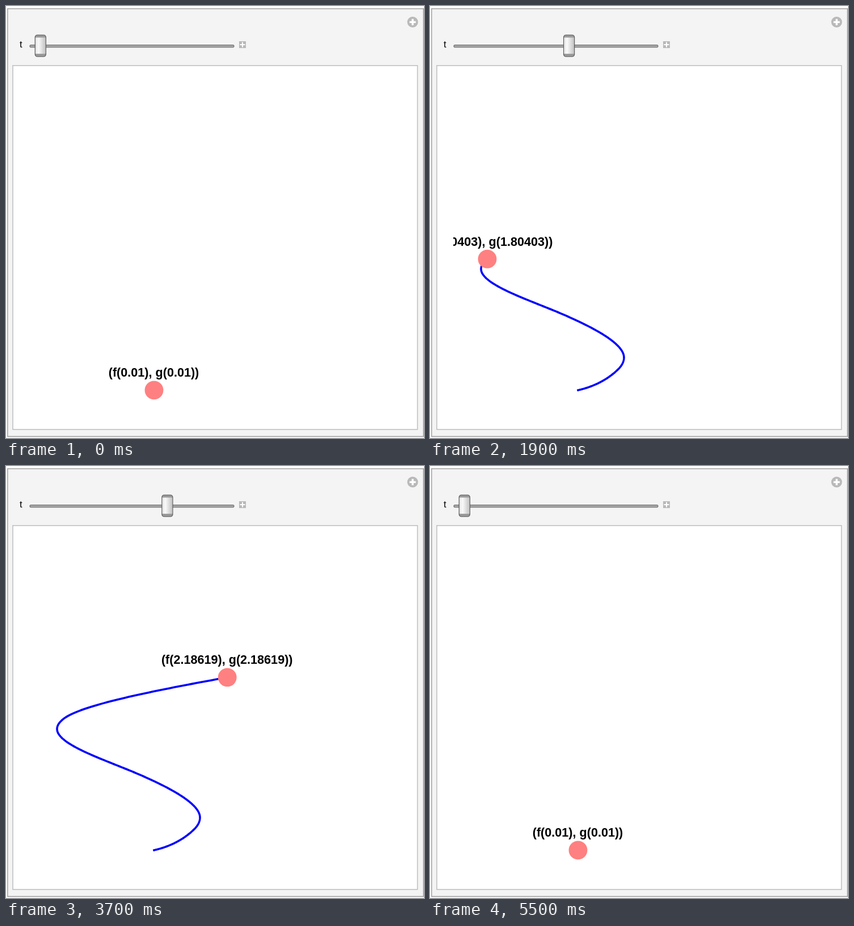
Animation, 737 px wide and 760 px high, one loop 6 s. Source, as an HTML page with a canvas:

```html
<!DOCTYPE html>
<html>
<head>
<meta charset="utf-8">
<style>
html, body { margin: 0; width: 100%; height: 100%; overflow: hidden; background: #fff; }
canvas { display: block; }
</style>
</head>
<body>
<canvas id="stage" width="737" height="760"></canvas>
<script>
const ctx = document.getElementById('stage').getContext('2d');
const T_MIN = 0.01, T_MAX = Math.PI;

// Knots of the horizontal motion: [t, x, dx/dt]
const knots = [
  [0, 259.3, 172], [0.53, 332, 102], [0.715, 342, 0], [1.2945, 217.3, -400],
  [1.71, 90, 0], [1.804, 101, 234], [2.186, 390, 1080], [2.541, 646, 0],
  [2.823, 448.3, -1130], [3.142, 140, -700]
];

function f(t) {
  let k = 0;
  while (k < knots.length - 2 && t > knots[k + 1][0]) k++;
  const [t0, x0, v0] = knots[k], [t1, x1, v1] = knots[k + 1];
  const h = t1 - t0, u = (t - t0) / h, w = 1 - u;
  return w * w * ((1 + 2 * u) * x0 + u * h * v0) + u * u * ((3 - 2 * u) * x1 - w * h * v1);
}

const g = t => 676.3 - t * (37.6 + t * (67.5 - 9.6 * t));

function box(x, y, w, h, r, fill, stroke, line = 1) {
  ctx.beginPath();
  ctx.roundRect(x, y, w, h, r);
  ctx.fillStyle = fill;
  ctx.fill();
  if (stroke) {
    ctx.strokeStyle = stroke;
    ctx.lineWidth = line;
    ctx.stroke();
  }
}

function disc(x, y, r, fill) {
  ctx.beginPath();
  ctx.arc(x, y, r, 0, 2 * Math.PI);
  ctx.fillStyle = fill;
  ctx.fill();
}

function plus(x, y, size, thick) {
  ctx.fillStyle = '#fff';
  ctx.fillRect(x - size / 2, y - thick / 2, size, thick);
  ctx.fillRect(x - thick / 2, y - size / 2, thick, size);
}

function thumb(x) {
  const body = ctx.createLinearGradient(x - 9, 0, x + 9, 0);
  body.addColorStop(0, '#e2e2e2');
  body.addColorStop(0.3, '#fafafa');
  body.addColorStop(1, '#c2c2c2');
  box(x - 9.5, 51, 19, 38, 4, '#9a9a9a', '#555', 1.2);
  ctx.fillStyle = body;
  ctx.fillRect(x - 8.9, 55.5, 17.8, 28.5);
}

function panel(t) {
  ctx.fillStyle = '#fff';
  ctx.fillRect(0, 0, 737, 760);
  box(2.8, 4.8, 733.4, 752.6, 0, '#f4f4f4', '#a3a3a3', 1.6);
  box(12, 104.7, 713.5, 640.3, 0, '#fff', '#bdbdbd', 1.5);
  disc(717, 28.3, 9.5, '#b9b9b9');
  plus(717, 28.3, 11, 3.4);
  box(411, 62, 12, 12, 0, '#b9b9b9');
  plus(417, 68, 9, 2);
  ctx.font = '17px "Liberation Sans", Arial, sans-serif';
  ctx.textAlign = 'left';
  ctx.fillStyle = '#000';
  ctx.fillText('t', 24, 73);
  box(42, 68.5, 360, 4.2, 2.1, '#a6a6a6', '#6c6c6c', 1.1);
  thumb(60.8 + 321.8 * (t - T_MIN) / (T_MAX - T_MIN));
}

function plot(t) {
  const x = f(t), y = g(t), label = +t.toPrecision(6);
  ctx.save();
  ctx.beginPath();
  ctx.rect(41, 106, 655, 638);
  ctx.clip();
  ctx.beginPath();
  for (let s = 0; s < t; s += 0.008) ctx.lineTo(f(s), g(s));
  ctx.lineTo(x, y);
  ctx.strokeStyle = '#00f';
  ctx.lineWidth = 3.6;
  ctx.stroke();
  disc(x, y, 16.4, '#ff8080');
  ctx.font = 'bold 21.6px "Liberation Sans", Arial, sans-serif';
  ctx.textAlign = 'center';
  ctx.fillStyle = '#000';
  ctx.fillText(`(f(${label}), g(${label}))`, x - 0.5, y - 23.5);
  ctx.restore();
}

// Ten poses per second; t rests at its minimum, rises to the middle of the loop and returns
function draw(now) {
  const phase = Math.floor(now % 6000 / 100) / 59;
  const rise = Math.max(0, (Math.min(phase, 1 - phase) - 1 / 12) / (5 / 12));
  const t = T_MIN + (T_MAX - T_MIN) * rise;
  panel(t);
  plot(t);
}

const start = performance.now();
function tick() {
  draw(performance.now() - start);
  requestAnimationFrame(tick);
}
tick();
</script>
</body>
</html>
```
